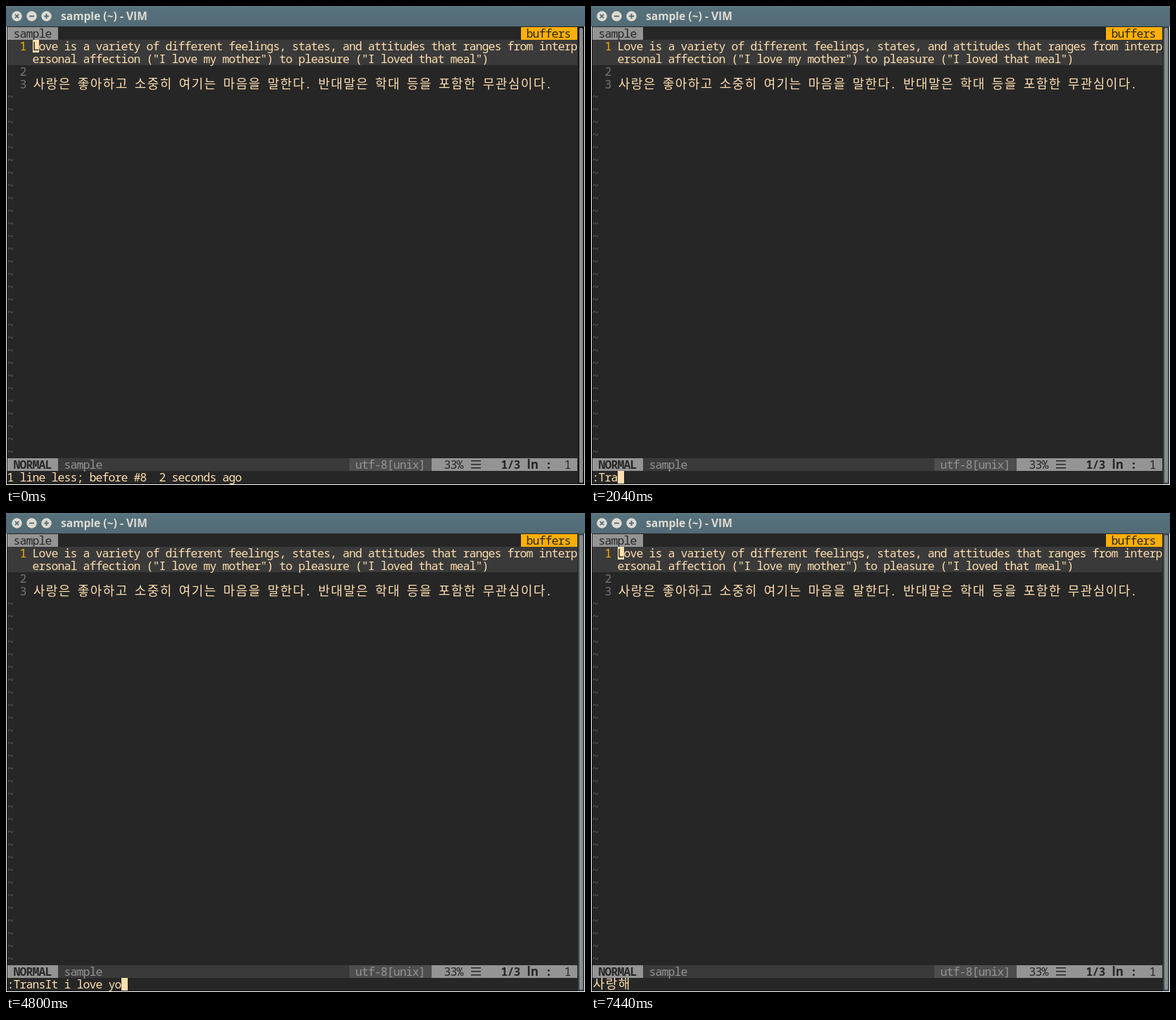
Recreate the animation shown at these times as an HTML page. Size 823 by 680 pixels, loop 8000 ms.

```html
<!DOCTYPE html>
<html lang="ko">
<head>
<meta charset="utf-8">
<title>sample (~) - VIM</title>
<style>
  html, body { margin: 0; width: 100%; height: 100%; overflow: hidden; background: #262626; }
  svg { display: block; width: 823px; height: 680px; }
  text { white-space: pre; font: 16.5px "Noto Sans Mono", "DejaVu Sans Mono", monospace; }
  .bold { font-weight: 700; }
  .wide { font: 18px "Noto Sans CJK KR", "Noto Sans CJK", "Noto Sans CJK JP", sans-serif; }
  .title { font: 700 15.6px "Open Sans", "Noto Sans", sans-serif; }
  .unit { font: 700 17px "Noto Sans", "Open Sans", sans-serif; }
</style>
</head>
<body>
<svg id="stage" viewBox="0 0 823 680">
  <defs>
    <linearGradient id="bar" x2="0" y2="1">
      <stop offset="0" stop-color="#607a85"/>
      <stop offset=".12" stop-color="#57717c"/>
      <stop offset="1" stop-color="#526b76"/>
    </linearGradient>
  </defs>
</svg>
<script>
const NS = 'http://www.w3.org/2000/svg';
const LOOP = 8000, CELL = 9, ROW = 18, LEFT = 2, TOP = 30;
const BG = '#262626', LINE = '#3a3a3a', MID = '#4e4e4e', GREY = '#949494';
const TEXT = '#ffdfaf', GOLD = '#ffaf00', DIM = '#767676', LIGHT = '#dfdbd2';
const CMD_ROW = 35, COMMAND = ':TransIt i love you';
const stage = document.getElementById('stage');

function add(tag, attrs, parent = stage) {
  const node = document.createElementNS(NS, tag);
  for (const key in attrs) node.setAttribute(key, attrs[key]);
  return parent.appendChild(node);
}

const rect = (x, y, width, height, fill, rx = 0) => add('rect', { x, y, width, height, fill, rx });
const cellX = col => LEFT + col * CELL;
const rowY = row => TOP + row * ROW;
const isWide = ch => ch >= '\uac00' && ch <= '\ud7a3';

const block = (col, row, cols, fill, rows = 1) =>
  rect(cellX(col), rowY(row), cols * CELL, rows * ROW, fill);

// Centres glyphs on the terminal grid; Hangul takes two cells.
function print(str, col, row, fill, cls = '', parent = stage) {
  let run = null;
  for (const ch of str) {
    const wide = isWide(ch);
    if (!run || run.wide !== wide) run = { wide, chars: '', xs: [], node: add('text', {
      y: rowY(row) + 15, fill, class: wide ? 'wide' : cls }, parent) };
    run.chars += ch;
    run.xs.push(cellX(col) + (wide ? 0.7 : -0.45));
    run.node.textContent = run.chars;
    run.node.setAttribute('x', run.xs.join(' '));
    col += wide ? 2 : 1;
  }
}

function drawTitleBar() {
  rect(0, 0, 823, 29, 'url(#bar)');
  const marks = ['M-2.6-2.6 2.6 2.6M2.6-2.6-2.6 2.6', 'M-3.5 0H3.5', 'M-3.5 0H3.5M0-3.5V3.5'];
  marks.forEach((d, i) => {
    const g = add('g', { transform: `translate(${15.5 + 21 * i} 14.5)` });
    add('circle', { r: 7.2, fill: LIGHT }, g);
    add('path', { d, stroke: '#56707b', 'stroke-width': 2 }, g);
  });
  add('text', { x: 78, y: 20, fill: LIGHT, class: 'title' }).textContent = 'sample (~) - VIM';
}

function drawEditor() {
  block(0, 0, 8, GREY);
  print('sample', 1, 0, BG);
  rect(732, TOP, 80, ROW, GOLD);
  print('buffers', 82, 0, BG);

  block(0, 1, 90, LINE, 2);
  print('1', 2, 1, GOLD);
  print('Love is a variety of different feelings, states, and attitudes that ranges from interp', 4, 1, TEXT);
  print('ersonal affection ("I love my mother") to pleasure ("I loved that meal")', 4, 2, TEXT);
  print('2', 2, 3, DIM);
  print('3', 2, 4, DIM);
  print('사랑은 좋아하고 소중히 여기는 마음을 말한다. 반대말은 학대 등을 포함한 무관심이다.', 4, 4, TEXT);
  for (let row = 5; row < 34; row++) print('~', 0, row, '#585858');
}

function drawStatus() {
  const row = 34;
  block(0, row, 8, GREY);
  print('NORMAL', 1, row, BG, 'bold');
  block(8, row, 46, LINE);
  print('sample', 9, row, GREY);
  block(54, row, 13, MID);
  print('utf-8[unix]', 55, row, GREY);
  block(67, row, 23, GREY);
  print('33%', 69, row, BG);
  for (const y of [645, 650, 655]) rect(661, y, 14, 1.5, BG);
  print('1/3', 78, row, BG, 'bold');
  add('text', { x: 740.5, y: 657, fill: BG, class: 'unit' }).textContent = 'ln';
  print(':', 85, row, BG, 'bold');
  print('1', 88, row, BG);
}

rect(0, 0, 823, 680, '#fff');
rect(1, 29, 821, 650, '#1c1c1c');
rect(2, 29, 811, 649, BG);
drawTitleBar();
drawEditor();
drawStatus();
const trough = rect(813, 29, 9, 650, '#37474f');
rect(815, 31, 5, 646, '#8c8c8c', 2.5);
const live = add('g', {});

// Each step: start time, bottom line, cursor as [column, row] or nothing.
const home = [4, 1];
const typed = (time, count) => [time, COMMAND.slice(0, count), [count, CMD_ROW]];
const steps = [
  [0, '1 line less; before #8  2 seconds ago', home],
  typed(360, 1),
  [960, ':'],
  typed(1560, 1),
  typed(1920, 2), typed(2040, 4), typed(2160, 8),
  typed(2640, 9),
  typed(3360, 10), typed(3600, 11),
  typed(3840, 12), typed(3960, 14), typed(4320, 15),
  typed(4560, 16), typed(4680, 17), typed(4800, 18), typed(4920, 19),
  [5160, COMMAND, [0, CMD_ROW]],
  [5760, COMMAND],
  [6360, '사랑해', home],
  [6960, '사랑해'],
  [7440, '사랑해', home]
];

let shown = null;
function drawStep(step) {
  if (step === shown) return;
  shown = step;
  const [, line, cursor] = step;
  live.replaceChildren();
  print(line, 0, CMD_ROW, TEXT, '', live);
  if (!cursor) return;
  const [col, row] = cursor;
  add('rect', { x: cellX(col), y: rowY(row), width: CELL, height: ROW, fill: TEXT }, live);
  print(cursor === home ? 'L' : line[col] || ' ', col, row, BG, '', live);
}

function draw(time) {
  drawStep(steps.findLast(s => s[0] <= time));
  // The scrollbar trough fades from dark to slate in three ticks.
  const fade = Math.min(3, Math.floor(time / 120)) / 3;
  const mix = (a, b) => Math.round(a + (b - a) * fade);
  trough.setAttribute('fill', `rgb(${mix(28, 55)},${mix(28, 71)},${mix(28, 79)})`);
}

const start = performance.now();
function tick() {
  draw((performance.now() - start) % LOOP);
  requestAnimationFrame(tick);
}
tick();
</script>
</body>
</html>
```
